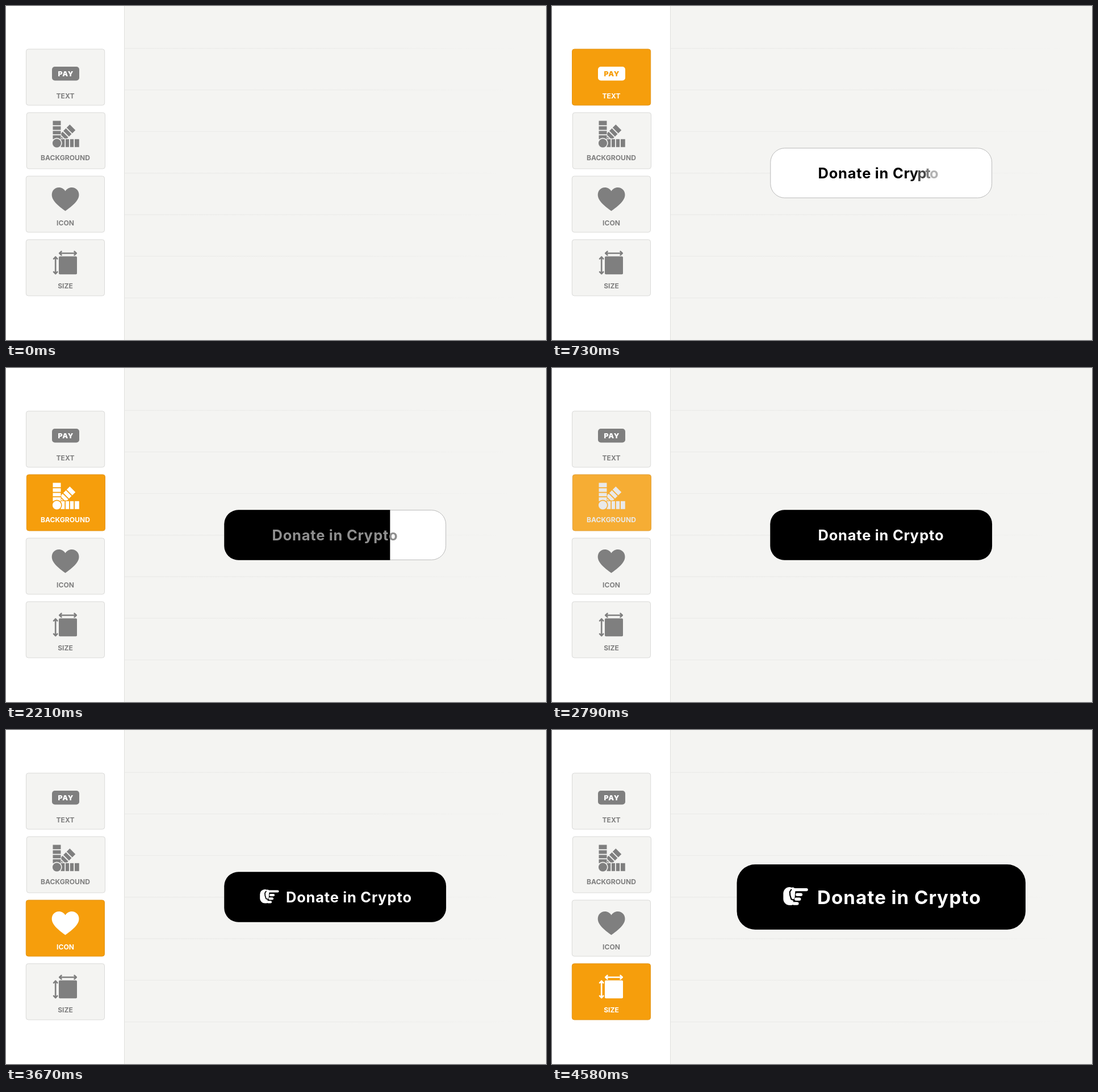
An HTML page with a canvas that plays this animation: 951x589 px, repeating every 4730 ms.

```html
<!DOCTYPE html>
<html lang="en">
<head>
<meta charset="utf-8">
<title>Button designer</title>
<style>
  html, body { margin: 0; width: 100%; height: 100%; overflow: hidden; background: #f4f4f2; }
  canvas { display: block; }
</style>
</head>
<body>
<canvas id="stage" width="951" height="589"></canvas>
<script>
const c = document.getElementById('stage').getContext('2d');
const LOOP = 4730;
const PAPER = [244, 244, 242], ORANGE = [246, 158, 12], GRAY = [127, 127, 127], WHITE = [255, 255, 255];
const CAPTION = 'Donate in Crypto';

const clamp = v => Math.min(1, Math.max(0, v));
const span = (t, from, to) => clamp((t - from) / (to - from));
const easeOut = (p, power) => 1 - (1 - p) ** power;
const mix = (a, b, p) => `rgb(${a.map((v, i) => Math.round(v + (b[i] - v) * p))})`;

function box(x, y, w, h, r, fill) {
  c.beginPath();
  c.roundRect(x, y, w, h, r);
  c.fillStyle = fill;
  c.fill();
}

function disc(x, y, r, fill) {
  c.beginPath();
  c.arc(x, y, r, 0, 7);
  c.fillStyle = fill;
  c.fill();
}

function line(points, width, color) {
  c.beginPath();
  points.forEach(([x, y]) => c.lineTo(x, y));
  c.lineWidth = width;
  c.strokeStyle = color;
  c.lineCap = c.lineJoin = 'round';
  c.stroke();
}

function label(text, x, y, font, fill, spacing = 0) {
  c.font = font;
  c.letterSpacing = spacing + 'px';
  c.textAlign = 'center';
  c.fillStyle = fill;
  c.fillText(text, x, y);
}

function scaleAbout(x, y, s) {
  c.translate(x, y);
  c.scale(s, s);
  c.translate(-x, -y);
}

// Icons

function payIcon(ink, paper, on) {
  box(81, 107, 48, 24.5, 5, ink);
  label('PAY', 105.3, 123.6, '900 12.4px Inter, sans-serif', mix(WHITE, ORANGE, on), 0.8);
}

function swatchStrip(angle, ink) {
  c.save();
  c.translate(89.5, 241.8);
  c.rotate(angle);
  for (const [x, w] of [[7, 6.8], [15.5, 6], [23.3, 6.4], [31.5, 7.8]]) box(x, -7, w, 14, 0, ink);
  c.restore();
}

function swatchIcon(ink, paper) {
  swatchStrip(-Math.PI / 4, ink);
  box(80, 201, 17.3, 48, 0, paper);
  box(82, 233.4, 48, 17, 0, paper);
  swatchStrip(-Math.PI / 2, ink);
  swatchStrip(0, ink);
  disc(89.5, 241.8, 9.2, paper);
  disc(89.5, 241.8, 7.6, ink);
}

function heartIcon(ink) {
  c.fillStyle = ink;
  c.fill(new Path2D('M104.5 361.5C96 355 80.7 345 80.7 333C80.7 325.5 86 320 93 320C98 320 102 322.5 104.5 326.5' +
    'C107 322.5 111 320 116 320C123 320 128.5 325.5 128.5 333C128.5 345 113 355 104.5 361.5Z'));
}

function sizeIcon(ink) {
  box(93, 441.5, 32, 31.7, 2, ink);
  for (const [x, y, angle] of [[109, 436, 0], [87.2, 457.4, Math.PI / 2]]) {
    c.save();
    c.translate(x, y);
    c.rotate(angle);
    line([[-14.5, 0], [14.5, 0]], 2.6, ink);
    for (const s of [-1, 1]) line([[s * 11.5, -3.2], [s * 14.7, 0], [s * 11.5, 3.2]], 2.6, ink);
    c.restore();
  }
}

function handIcon() {
  box(447.2, 281, 13.5, 24.6, [9, 5, 3, 9], '#fff');
  line([[460, 285], [459.3, 294.5]], 7, '#fff');
  line([[458, 284.5], [456, 287.5], [456.3, 292], [458, 297.5], [462, 299]], 1.7, '#000');
  line([[461, 284.6], [478.6, 284.6]], 4, '#fff');
  for (const [from, to, y] of [[466, 471, 291.2], [464.5, 469, 297.4], [461.5, 466, 303.4]]) {
    line([[from, y], [to, y]], 4.2, '#fff');
  }
}

// Each card: label, baseline, left edge, icon, time its turn begins
const cards = [
  ['TEXT', 162.6, 35.5, payIcon, -75],
  ['BACKGROUND', 272.4, 36.3, swatchIcon, 1480],
  ['ICON', 386.8, 35.3, heartIcon, 2760],
  ['SIZE', 498.4, 35.3, sizeIcon, 3740]
];

function drawCard([text, baseline, left, icon, start], i, t) {
  const end = i < 3 ? cards[i + 1][4] : LOOP;
  const on = span(t, start + 206, start + 495);
  const lit = on * (1 - span(t, end, end + 180));
  const press = span(t, start + 105, start + 206);
  const scale = 1 - 0.1 * press + 0.1 * easeOut(on, 1.4);
  const ink = mix(GRAY, WHITE, lit), paper = mix(PAPER, ORANGE, lit);
  const top = 76 + i * 112;

  c.save();
  scaleAbout(104.5, top + 49.5, scale);
  box(left, top, 138.2, 99, 4, paper);
  c.lineWidth = 1;
  c.strokeStyle = mix([218, 218, 216], [226, 148, 24], lit);
  c.stroke();
  icon(ink, paper, lit);
  label(text, 104.5, baseline, '700 12.1px Inter, sans-serif', ink);
  c.restore();
}

function drawCaption(t, shade, shift) {
  c.font = '700 25.5px Inter, sans-serif';
  c.letterSpacing = '0.75px';
  c.textAlign = 'left';
  c.fillStyle = mix([0, 0, 0], WHITE, shade);
  const soft = 4.7;
  const front = easeOut(span(t, 400, 1210), 3.4) * (CAPTION.length - 1 + soft);
  [...CAPTION].forEach((letter, i) => {
    const p = clamp((front - i) / soft);
    c.globalAlpha = p;
    c.fillText(letter, 468.5 + shift + c.measureText(CAPTION.slice(0, i)).width - 13 * (1 - p), 303.8);
  });
  c.globalAlpha = 1;
}

function drawButton(t) {
  const pop = easeOut(span(t, 200, 420), 3);
  if (!pop) return;
  const wipe = span(t, 1975, 2450);
  const slide = easeOut(span(t, 3255, 3700), 2);
  const grow = easeOut(span(t, 4235, 4580), 3);

  c.save();
  scaleAbout(579.6, 294.5, 0.9 + 0.1 * pop + 0.301 * grow);
  c.globalAlpha = pop;
  box(384.8, 250.7, 389.8, 87.6, 25, '#fff');
  c.lineWidth = 0.8;
  c.strokeStyle = '#aaa';
  c.stroke();
  c.globalAlpha = 1;

  c.save();
  c.beginPath();
  c.roundRect(384.3, 250.3, 390.8, 88.4, 25);
  c.clip();
  box(384, 250, 391.5 * easeOut(wipe, 2), 89, 0, '#000');
  c.restore();

  if (slide) {
    // A thinning black veil fades the hand in
    handIcon();
    box(446, 279, 36, 29, 0, `rgba(0, 0, 0, ${1 - slide})`);
  }
  drawCaption(t, easeOut(wipe, 1.2), 24.6 * slide);
  c.restore();
}

function drawBackdrop() {
  box(0, 0, 951, 589, 0, '#f4f4f2');
  const fade = c.createLinearGradient(209, 0, 900, 0);
  fade.addColorStop(0, '#ececea');
  fade.addColorStop(0.6, '#ededeb');
  fade.addColorStop(1, '#f4f4f2');
  for (let i = 0; i < 7; i++) box(209, 74 + i * 73.33, 691, 1.4, 0, fade);
  box(0, 0, 208, 589, 0, '#fff');
  box(208, 0, 1, 589, 0, '#e0e0de');
}

function frame(now) {
  const t = now % LOOP;
  drawBackdrop();
  cards.forEach((card, i) => drawCard(card, i, t));
  drawButton(t);
  requestAnimationFrame(frame);
}
requestAnimationFrame(frame);
</script>
</body>
</html>
```
